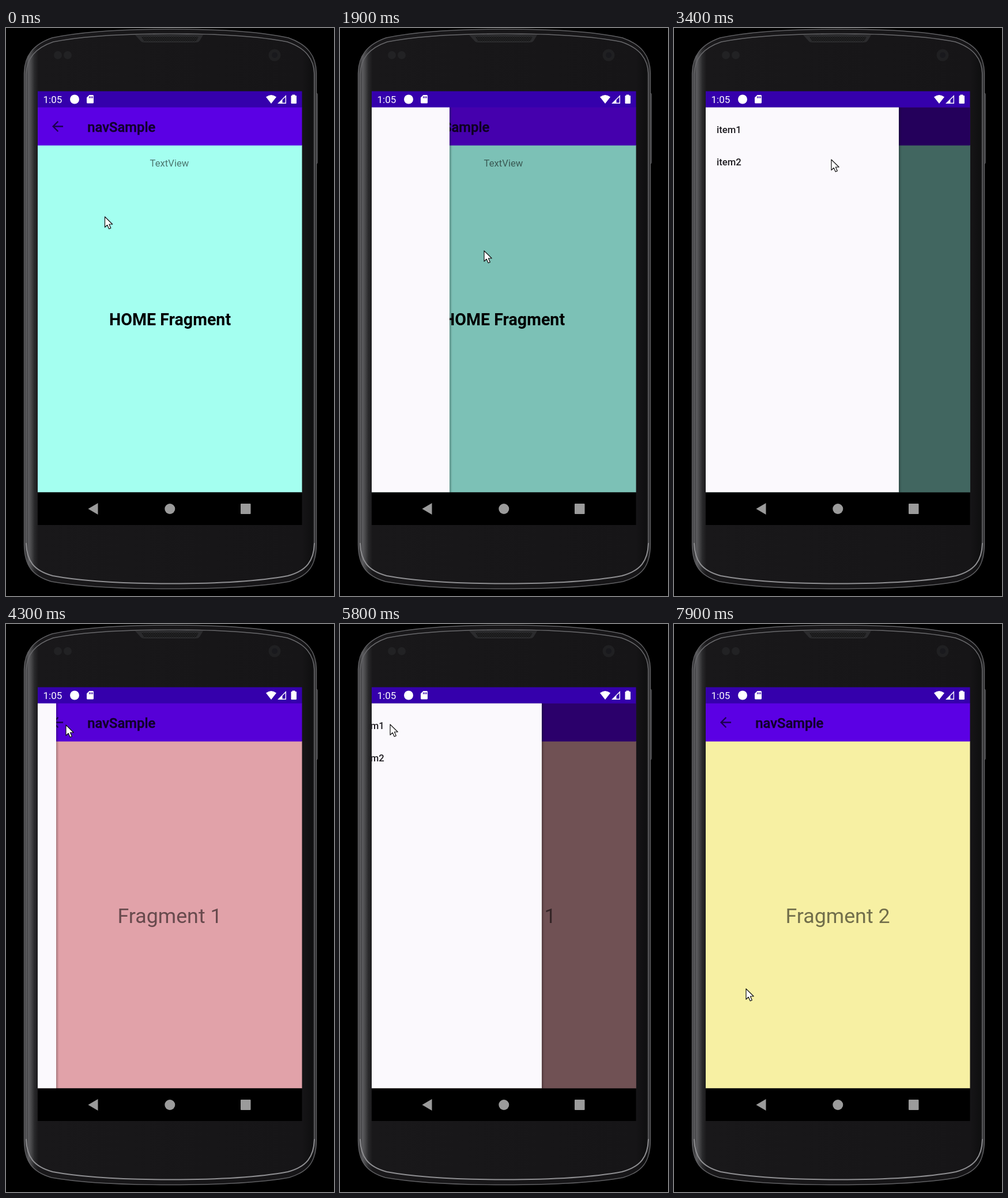
An HTML page that plays this animation: 569x984 px, repeating every 8 s.

```html
<!DOCTYPE html>
<html lang="en">
<head>
<meta charset="utf-8">
<title>Navigation drawer</title>
<style>
  html, body { margin: 0; width: 100%; height: 100%; overflow: hidden; background: #000; }
  svg { display: block; width: 100%; height: 100%; }
  text { font-family: Roboto, sans-serif; }
  .mid { text-anchor: middle; }
  .soft { fill: #000; fill-opacity: .54; }
  .item { font-size: 16.7px; font-weight: 500; fill: #1d1b20; }
</style>
</head>
<body>
<svg viewBox="0 0 569 984">
  <defs>
    <clipPath id="screen"><rect x="55" y="137.500" width="458.500" height="667"/></clipPath>
    <linearGradient id="side" gradientUnits="userSpaceOnUse" x1="31" x2="539">
      <stop offset="0" stop-color="#505053"/>
      <stop offset=".008" stop-color="#38383a"/>
      <stop offset=".016" stop-color="#5c5c5f"/>
      <stop offset=".026" stop-color="#454547"/>
      <stop offset=".036" stop-color="#29292b"/>
      <stop offset=".05" stop-color="#19181a"/>
      <stop offset=".95" stop-color="#161517"/>
      <stop offset=".985" stop-color="#0f0f10"/>
      <stop offset="1" stop-color="#39393b"/>
    </linearGradient>
    <linearGradient id="shade">
      <stop offset="0" stop-color="#000" stop-opacity=".26"/>
      <stop offset="1" stop-color="#000" stop-opacity="0"/>
    </linearGradient>
    <pattern id="mesh" width="4" height="4" patternUnits="userSpaceOnUse">
      <rect width="4" height="4" fill="#252526"/>
      <circle cx="1" cy="1" r=".9" fill="#0d0d0e"/><circle cx="3" cy="3" r=".9" fill="#0d0d0e"/>
    </pattern>
  </defs>

  <!-- phone body -->
  <rect x="536" y="113" width="4.500" height="122" rx="2" fill="#343436" stroke="#626264" stroke-width=".7"/>
  <path d="M31.500 895V78C32 49 46 29 80 17C135 5 210 2 285 2S435 5 490 17C524 29 538 49 538.500 78V895
    C538 931 525 949 491 959C435 969 360 971.500 285 971.500S135 969 79 959C45 949 32 931 31.500 895Z"
    fill="url(#side)" stroke="#5f5f62" stroke-width="1.400"/>
  <g fill="none" stroke-linecap="round">
    <path d="M35 893V80C36 53 50 35 82 24C137 13 210 10 285 10S433 13 488 24C520 35 534 53 535 80V893"
      stroke="#68686b" stroke-width="1.500"/>
    <path d="M35 893C36 923 48 940 81 949C135 959 210 962.500 285 962.500S435 959 489 949C522 940 534 923 535 893"
      stroke="#8f8f92" stroke-width="2"/>
  </g>
  <path d="M224 12Q285 9 342 12L336 22Q334 25 329 25H240Q235 25 233 22Z" fill="#2b2b2d"/>
  <path d="M235 15H334L330 23H239Z" fill="url(#mesh)"/>
  <g fill="#222224"><circle cx="90" cy="47" r="7"/><circle cx="107" cy="47" r="7"/></g>
  <circle cx="466" cy="47" r="10.500" fill="#202022"/>
  <circle cx="466" cy="47" r="5" fill="#19191d"/>

  <!-- status bar -->
  <rect x="55" y="109.500" width="458.500" height="28.500" fill="#3500ac"/>
  <g fill="#fff">
    <text x="64.500" y="130" font-size="17">1:05</text>
    <circle cx="119" cy="123.500" r="8"/>
    <path fill-rule="evenodd" d="M144.500 116H150.500Q152 116 152 117.500V129Q152 130.500 150.500 130.500H141.500Q140 130.500 140 129V120.500Z
      M144 118.500V121.500H145.500V118.500ZM146.700 118.500V121.500H148.200V118.500ZM149.300 118.500V121.500H150.800V118.500Z"/>
    <path d="M451 119.500Q460 112.500 469 119.500L460 131Z"/>
    <path fill-rule="evenodd" d="M486 116V131H471ZM484.600 119.500L479.500 124.600V129.600H484.600Z"/>
    <path d="M496.500 117V115.500H501.500V117H503Q504 117 504 118V130Q504 131 503 131H495.500Q494.500 131 494.500 130V118Q494.500 117 495.500 117Z"/>
  </g>

  <g clip-path="url(#screen)">
    <rect id="page" x="55" y="203" width="459" height="602"/>
    <rect x="55" y="137" width="459" height="66.500" fill="#5b00e4"/>
    <path transform="translate(75.200 156.200) scale(1.193)" fill="#1d0052"
      d="M20 11H7.830l5.590-5.590L12 4l-8 8 8 8 1.410-1.410L7.830 13H20z"/>
    <text x="141.300" y="179.500" font-size="23.800" font-weight="500" fill="#12002d" stroke="#12002d" stroke-width=".5">navSample</text>
    <g id="home">
      <text class="mid soft" x="283.500" y="239.500" font-size="16.700">TextView</text>
      <text class="mid" x="284.500" y="514.500" font-size="28.600" font-weight="700">HOME Fragment</text>
    </g>
    <text id="label" class="mid soft" x="284" y="518" font-size="35.800"></text>
    <rect id="scrim" x="55" y="137" width="459" height="668"/>
    <g id="drawer">
      <rect x="390" y="137" width="5" height="668" fill="url(#shade)"/>
      <rect x="55" y="137" width="335" height="668" fill="#fbf9fd"/>
      <text class="item" x="74" y="181.500">item1</text>
      <text class="item" x="74" y="238">item2</text>
    </g>
  </g>

  <!-- system buttons -->
  <rect x="55" y="804.500" width="458.500" height="56.500"/>
  <g fill="#9b9b9b">
    <path d="M142.500 833L159.500 823V843Z"/>
    <circle cx="284.300" cy="833" r="9"/>
    <rect x="407" y="824" width="17.500" height="18" rx="1"/>
  </g>

  <path id="cursor" d="M0 0V18.200L4.200 14.300L7.200 21L10.300 19.600L7.400 13H13.200Z"
    fill="#fff" stroke="#111" stroke-width="1.200" stroke-linejoin="round"/>
</svg>

<script>
const LOOP = 8000, STEP = 100, DRAWER = 335, SETTLE = 512;
const $ = id => document.getElementById(id);

// [time, x, y] of the pointer tip
const pointer = [
  [0, 171.5, 327], [900, 150, 350], [1500, 49, 384], [1700, 62, 387],
  [1900, 250, 386], [2100, 325, 378], [2700, 310, 300], [3300, 273, 228],
  [3500, 273, 228], [4000, 104, 175], [4400, 104, 175], [5000, 87, 174],
  [5900, 87, 174], [6400, 89, 229], [6900, 89, 229], [7700, 125, 632], [8000, 125, 632]
];
// [time, openness] while the drawer is pulled by hand
const pull = [[1700, 0], [1800, .1], [1900, .403], [2000, .75], [2100, .93], [2200, 1]];
// [time, fill, label]
const pages = [
  [0, '#a4fff0', ''], [4100, '#efacb4', 'Fragment 1'], [6600, '#f7f0a3', 'Fragment 2']
];

function sample(keys, t, smooth) {
  if (t <= keys[0][0]) return keys[0].slice(1);
  const i = keys.findIndex(k => k[0] > t);
  if (i < 0) return keys[keys.length - 1].slice(1);
  const a = keys[i - 1], b = keys[i];
  let p = (t - a[0]) / (b[0] - a[0]);
  if (smooth) p = p * p * (3 - 2 * p);
  return a.slice(1).map((v, j) => v + (b[j + 1] - v) * p);
}

// quintic ease-out of a settling drawer
const settle = (t, start) => 1 - (1 - Math.min(1, (t - start) / SETTLE)) ** 5;

function openness(t) {
  if (t >= 6624) return 1 - settle(t, 6624);
  if (t >= 5622) return settle(t, 5622);
  if (t >= 4108) return 1 - settle(t, 4108);
  return sample(pull, t)[0];
}

function draw(t) {
  const [, fill, label] = pages.filter(p => p[0] <= t).pop();
  $('page').setAttribute('fill', fill);
  $('home').style.display = label ? 'none' : '';
  $('label').textContent = label;

  const open = openness(t);
  $('scrim').setAttribute('fill-opacity', .6 * open);
  $('drawer').style.display = open > 0 ? '' : 'none';
  $('drawer').setAttribute('transform', `translate(${Math.round(DRAWER * (open - 1))} 0)`);

  const [x, y] = sample(pointer, t, true);
  $('cursor').setAttribute('transform', `translate(${x} ${y})`);
}

const began = performance.now();
function tick() {
  const t = (performance.now() - began) % LOOP;
  draw(Math.floor(t / STEP) * STEP);
  requestAnimationFrame(tick);
}
tick();
</script>
</body>
</html>
```
